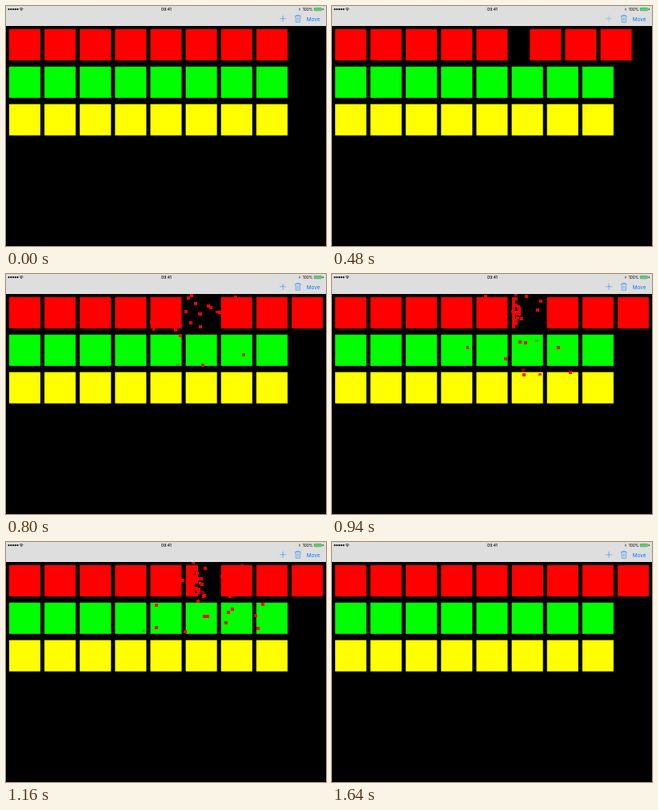
These frames come from a looping animation (400x300 px, 1680 ms). An HTML page:

```html
<!DOCTYPE html>
<html lang="en">
<head>
<meta charset="utf-8">
<title>Tile insertion</title>
<style>
  html, body { margin: 0; width: 100%; height: 100%; overflow: hidden; background: #000; }
  svg { display: block; width: 100vw; height: 100vh; }
  text { font-family: "Inter", "Roboto", sans-serif; }
  .line { fill: none; stroke: #1686f5; stroke-width: 1.4; }
  #bits { fill: #f00; shape-rendering: crispEdges; }
</style>
</head>
<body>
<svg viewBox="0 0 1024 768">
  <rect width="1024" height="768"/>
  <g id="tiles"></g>
  <g id="bits"></g>

  <rect width="1024" height="64" fill="#dedede"/>
  <g id="signal"></g>
  <g fill="none" stroke="#000" stroke-width="1.8">
    <path d="M43 9Q49 4 55 9M45.5 12Q49 9 52.5 12"/>
    <circle cx="49" cy="14" r=".6"/>
  </g>
  <text x="513" y="14.6" font-size="12.5" font-weight="500" text-anchor="middle">09:41</text>
  <rect x="937" y="7" width="5" height="7" fill="#8a8a8a"/>
  <text x="982" y="14.6" font-size="12.5" text-anchor="end">100%</text>
  <rect x="986" y="6" width="24" height="9" rx="2" fill="#4cd964" stroke="#555"/>
  <rect x="1013" y="8" width="3" height="5" fill="#333"/>

  <path id="plus" class="line" d="M876 40.5h20M886 30.5v20"/>
  <path class="line" d="M924 32h20M930 32v-3h8v3M926 32l1.5 20h13l1.5-20"/>
  <path class="line" stroke-opacity=".6" d="M931 36v12M934 36v12M937 36v12"/>
  <text x="962" y="48" font-size="16.5" fill="#007aff">Move</text>
</svg>
<script>
const LOOP = 1680, SIZE = 100, GAP = 5, CELLS = 10, BIT = SIZE / CELLS;
const SPREAD = 200, HOLD = 110, FLIGHT = 240;
const svg = id => document.getElementById(id);
const clamp = v => Math.max(0, Math.min(1, v));
const ease = v => (1 - Math.cos(Math.PI * clamp(v))) / 2;
const mix = (a, b, t) => a + (b - a) * t;
const tileX = column => 10 + 113 * column;
const tileY = row => 74 + 120 * row;

function add(parent, name, attrs) {
  const node = document.createElementNS('http://www.w3.org/2000/svg', name);
  for (const key in attrs) node.setAttribute(key, attrs[key]);
  return parent.appendChild(node);
}

let seed = 11;
const random = () => (seed = seed * 16807 % 2147483647) / 2147483647;
const scatter = () => (random() * 2 - 1) * SPREAD;

for (let i = 0; i < 5; i++) add(svg('signal'), 'circle', { cx: 9 + i * 7, cy: 10.5, r: 2.8 });

const movers = [];
['#f00', '#0f0', '#ff0'].forEach((fill, row) => {
  for (let column = 0; column < 8; column++) {
    const tile = add(svg('tiles'), 'rect', { x: tileX(column), y: tileY(row), width: SIZE, height: SIZE, fill });
    if (row === 0 && column >= GAP) movers.push(tile);
  }
});

// Columns fill from left to right in a loosely shuffled order.
const cells = Array.from({ length: CELLS * CELLS }, (_, i) => {
  const column = Math.floor(i / CELLS);
  return { column, row: i % CELLS, order: column + random() * 1.6 };
}).sort((a, b) => a.order - b.order);

// Bits start scattered around the gap; the toolbar hides the highest ones.
const bits = cells.map(({ column, row }, i) => ({
  node: add(svg('bits'), 'rect', { width: BIT, height: BIT }),
  x: tileX(GAP) + SIZE / 2 + scatter() - BIT / 2,
  y: tileY(0) + SIZE / 2 + scatter() - BIT / 2,
  endX: tileX(GAP) + column * BIT,
  endY: tileY(0) + row * BIT,
  begin: 470 + 810 * (i / cells.length) ** .85
}));

function draw(now) {
  const time = now % LOOP;
  const shift = (tileX(1) - tileX(0)) * ease((time - 313) / 330);
  movers.forEach((tile, i) => tile.setAttribute('x', tileX(GAP + i) + shift));
  svg('plus').style.opacity = time < 20 ? 1 : mix(.25, 1, clamp((time - 430) / 150));

  for (const bit of bits) {
    const age = time - bit.begin;
    const travel = ease((age - HOLD) / FLIGHT);
    bit.node.setAttribute('x', mix(bit.x, bit.endX, travel));
    bit.node.setAttribute('y', mix(bit.y, bit.endY, travel));
    bit.node.setAttribute('opacity', clamp(age / 70));
  }
}

function tick() {
  draw(performance.now());
  requestAnimationFrame(tick);
}
tick();
</script>
</body>
</html>
```
